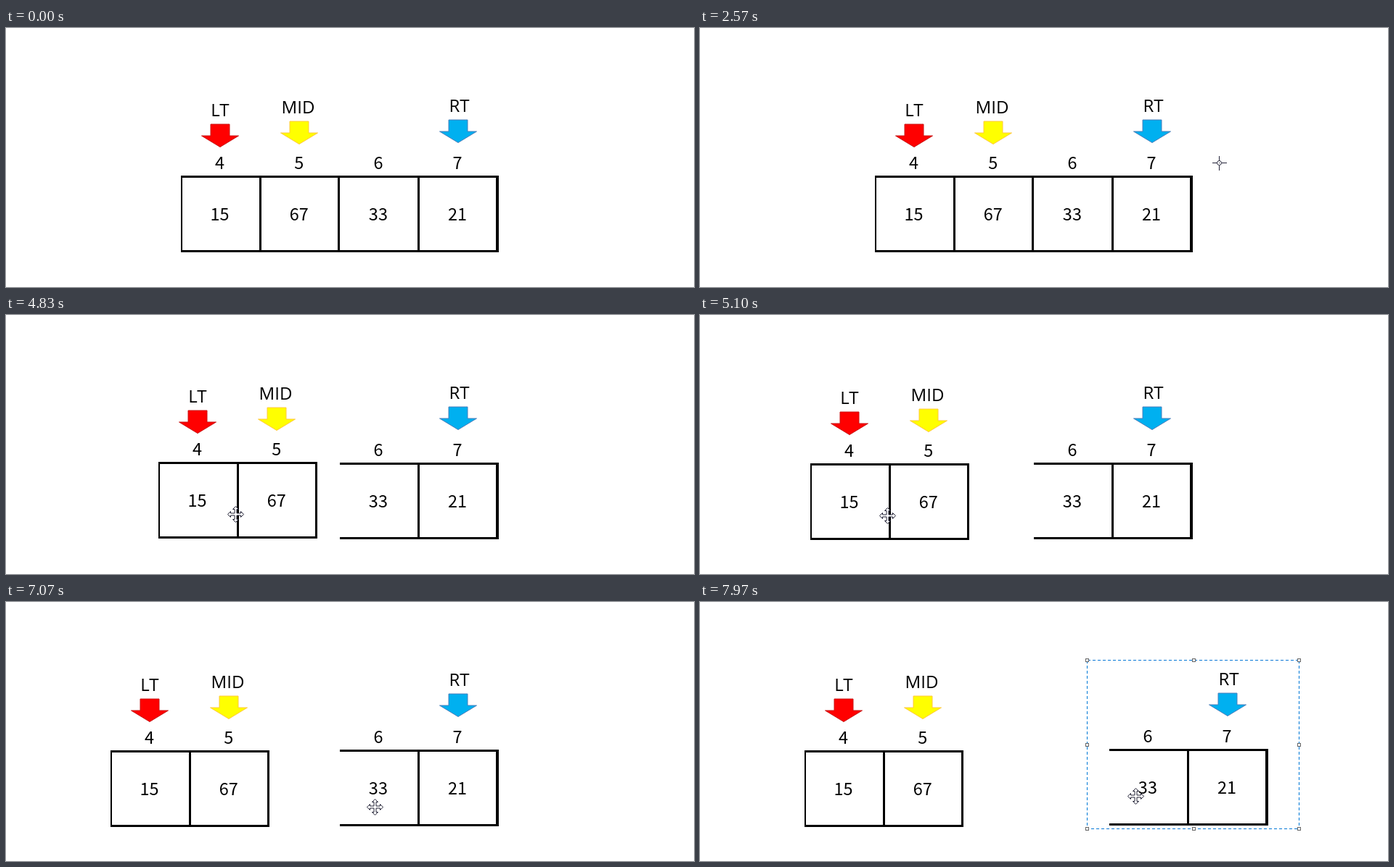
Recreate the animation shown at these times as an HTML page. Size 948 px wide and 358 px high, loop 8000 ms.

```html
<!DOCTYPE html>
<html lang="en">
<head>
<meta charset="utf-8">
<title>Splitting an array</title>
<style>
  html, body { margin: 0; width: 100%; height: 100%; overflow: hidden; background: #fff; }
  svg { display: block; width: 948px; height: 358px; }
  text { text-anchor: middle; fill: #000; }
  .num { font: 23.5px "Noto Sans CJK KR", "Noto Sans CJK JP", "Noto Sans CJK SC", "Open Sans", sans-serif; }
  .tag { font: 24px "Open Sans", "Noto Sans", sans-serif; }
  .line, .marquee, .handle { shape-rendering: crispEdges; }
  .marquee { fill: none; stroke-dasharray: 4 3; }
  .handle { fill: #fff; stroke: #666; }
</style>
</head>
<body>
<svg viewBox="0 0 948 358">
  <g id="left"></g>
  <g id="right"></g>
  <g id="frame">
    <path id="marquee" class="marquee"/>
    <g id="handles"></g>
  </g>
  <g id="cursor">
    <g id="cross" fill="none" stroke="#25253a">
      <path d="M-10 0H-3M3 0H10M0-10V-3M0 3V10" shape-rendering="crispEdges"/>
      <circle r="3"/>
      <path d="M-.5 0H.5"/>
    </g>
    <path id="move" fill="#fff" stroke="#202034"
      d="M0-11L4-7H1.5V-1.5H7V-4L11 0L7 4V1.5H1.5V7H4L0 11L-4 7H-1.5V1.5H-7V4L-11 0L-7-4V-1.5H-1.5V-7H-4Z"/>
  </g>
</svg>
<script>
const LOOP = 8000;
const $ = id => document.getElementById(id);

function add(parent, tag, attrs, text) {
  const el = document.createElementNS("http://www.w3.org/2000/svg", tag);
  for (const k in attrs) el.setAttribute(k, attrs[k]);
  if (text) el.textContent = text;
  parent.append(el);
  return el;
}

const bar = (g, x, y, width, height) => add(g, "rect", { class: "line", x, y, width, height });
const wall = (g, x, width) => bar(g, x, 204, width, 106);
const label = (g, cls, x, y, s) => add(g, "text", { class: cls, x, y }, s);

function pointer(g, x, y, name, nameX, fill, stroke) {
  label(g, "tag", nameX, y - 11.5, name);
  add(g, "path", {
    d: `M${x - 13} ${y}h26v16h12.5L${x} ${y + 31.5}L${x - 25.5} ${y + 16}h12.5z`, fill, stroke
  });
}

const left = $("left"), right = $("right");
for (const y of [204, 307]) {
  bar(left, 241, y, 219, 3);
  bar(right, 460, y, 219, 3);
}
wall(left, 241, 2);
wall(left, 349, 3);
wall(left, 457, 3);
wall(right, 567, 3);
wall(right, 675, 4);
["15", "67", "33", "21"].forEach((value, i) => {
  const g = i < 2 ? left : right, x = 294.5 + 109.2 * i;
  label(g, "num", x, 195, String(4 + i));
  label(g, "num", x, 266, value);
});
pointer(left, 295, 133, "LT", 295, "#f00", "#c81414");
pointer(left, 404, 129, "MID", 402.5, "#ff0", "#ffc83c");
pointer(right, 623, 127, "RT", 624.5, "#00b0f0", "#4a7ebb");

const progress = (t, a, b) => Math.min(1, Math.max(0, (t - a) / (b - a)));
const mix = (p, q, u) => p.map((v, i) => v + (q[i] - v) * u);
const easeOut = u => Math.sin(u * Math.PI / 2);

function orbit(cx, cy, rx, ry, degrees) {
  const a = degrees * Math.PI / 180;
  return [cx + rx * Math.cos(a), cy + ry * Math.sin(a)];
}

// Circle the left half, then the right half
function gesture(t) {
  if (t < 1900) {
    const p = orbit(340, 187, 111, 117, -40 - 230 * progress(t, 800, 1600));
    return mix(p, [478, 262], progress(t, 1630, 1900));
  }
  const p = orbit(588, 196, 127.5, 133, 150 + 420 * progress(t, 1900, 2930) ** 1.665);
  return mix(p, [460, 94], progress(t, 2930, 3000));
}

// Mouse strokes: start, end, destination
const strokes = [
  [3630, 4100, [244, 328]], [4200, 4300, [230, 328]],
  [4420, 4640, [347, 276]], [4700, 4830, [316, 275]], [4830, 5230, [250, 277]],
  [5700, 5870, [444, 277]], [5900, 6200, [793, 165]], [6220, 6470, [721, 82]],
  [6530, 6850, [430, 313]], [6900, 7040, [508, 283]],
  [7130, 7672, [612, 282]], [7800, 7950, [600, 268]]
];

function mouse(t) {
  let p = gesture(t);
  for (const [a, b, to] of strokes) p = mix(p, to, easeOut(progress(t, a, b)));
  return p.map(Math.round);
}

function dragged(t, start, end) {
  if (t < start) return [0, 0];
  const a = mouse(start), b = mouse(Math.min(t, end));
  return [b[0] - a[0], b[1] - a[1]];
}

const handles = Array.from({ length: 8 }, () =>
  add($("handles"), "rect", { class: "handle", width: 4, height: 4 }));

function drawFrame(x0, y0, x1, y1, color, grips) {
  const [a, b, c, d] = [x0, y0, x1, y1].map(v => v + .5);
  $("frame").style.display = "";
  $("marquee").setAttribute("d", `M${a} ${b}H${c}M${a} ${b}V${d}H${c}M${c} ${b}V${d}`);
  $("marquee").style.stroke = color;
  $("handles").style.display = grips ? "" : "none";
  const mid = (p, q) => Math.round((p + q + 1) / 2) + .5;
  const mx = mid(x0, x1), my = mid(y0, y1);
  const spots = [[a, b], [mx, b], [c, b], [a, my], [c, my], [a, d], [mx, d], [c, d]];
  spots.forEach(([x, y], i) => {
    handles[i].setAttribute("x", x - 2);
    handles[i].setAttribute("y", y - 2);
  });
}

const within = (t, a, b) => t >= a && t < b;
const BLUE = "#0078d7", DARK = "#000";

function render(t) {
  const [x, y] = mouse(t);
  const l = dragged(t, 4700, 5230), r = dragged(t, 7130, 7680);
  left.setAttribute("transform", `translate(${l})`);
  right.setAttribute("transform", `translate(${r})`);

  $("frame").style.display = "none";
  if (within(t, 3660, 4400)) {
    drawFrame(Math.min(x + 2, 459), 94, 459, Math.max(y - 1, 94), DARK, false);
  } else if (within(t, 4400, 4690) || within(t, 5700, 6480)) {
    drawFrame(229 + l[0], 93 + l[1], 460 + l[0], 326 + l[1], BLUE, true);
  } else if (within(t, 6540, 6870)) {
    drawFrame(Math.min(x, 721), 81, 721, Math.max(y, 81), DARK, false);
  } else if (within(t, 6870, 7050) || t >= 7720) {
    drawFrame(429 + r[0], 81 + r[1], 721 + r[0], 314 + r[1], BLUE, true);
  }

  const moving = within(t, 4430, 5790) || t >= 6900;
  $("cursor").style.display = t < 800 ? "none" : "";
  $("cursor").setAttribute("transform", `translate(${x + .5} ${y + .5})`);
  $("cross").style.display = moving ? "none" : "";
  $("move").style.display = moving ? "" : "none";
}

const begin = performance.now();
function tick() {
  render((performance.now() - begin) % LOOP);
  requestAnimationFrame(tick);
}
tick();
</script>
</body>
</html>
```
